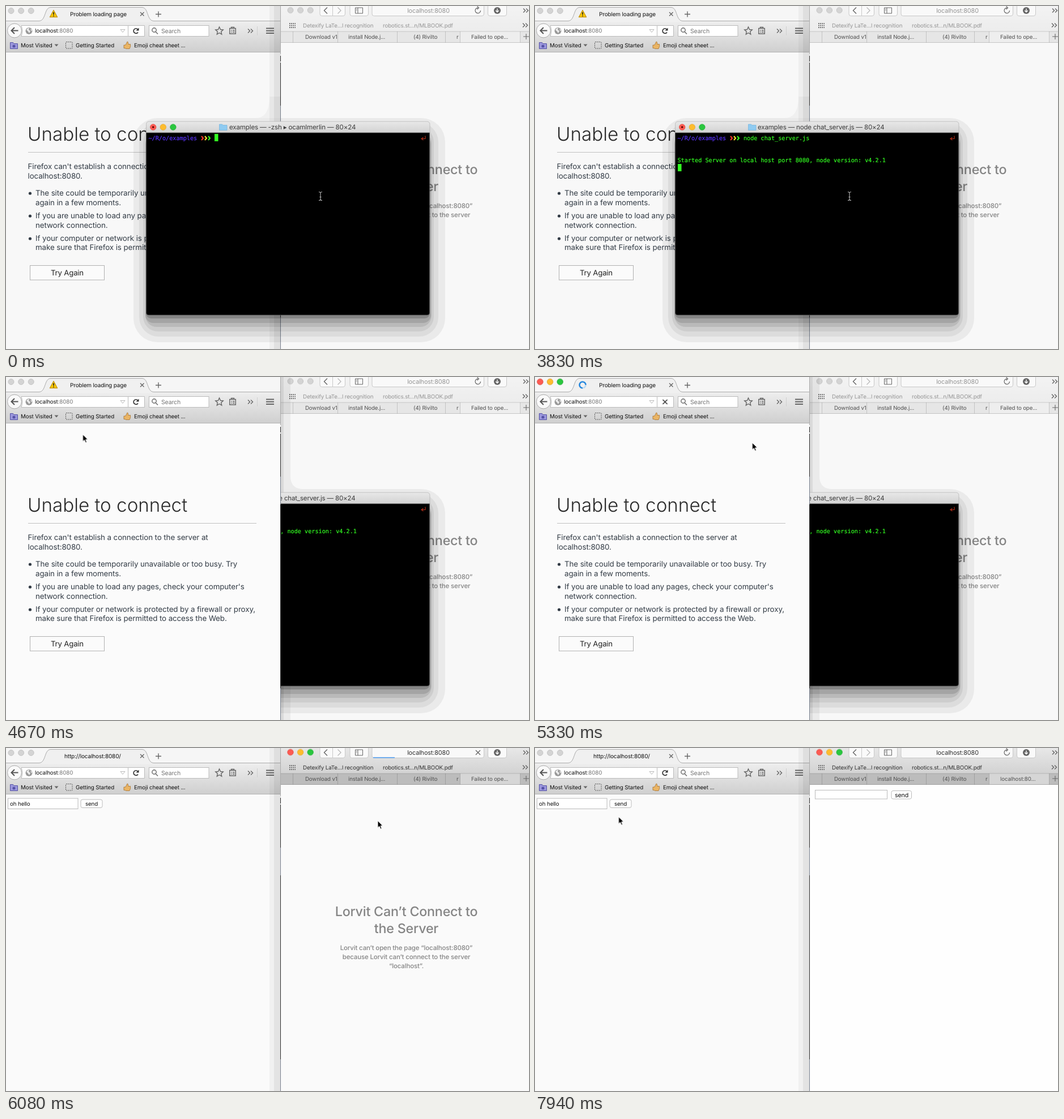
Recreate the animation shown at these times as an HTML page. Size 923 by 606 pixels, loop 8 s.

```html
<!DOCTYPE html>
<html lang="en">
<head>
<meta charset="utf-8">
<title>Chat server demo</title>
<style>
html, body { margin: 0; width: 100%; height: 100%; overflow: hidden; background: #f8f8f8; }
svg { position: absolute; left: 0; top: 0; width: 923px; height: 606px; }
text { font-family: Inter, "Open Sans", sans-serif; letter-spacing: -.014em; text-rendering: geometricPrecision; white-space: pre; }
.mono text { font: 10.19px "DejaVu Sans Mono", monospace; letter-spacing: 0; fill: #3f2; stroke: #3f2; stroke-width: .2; }
.mono .path { fill: #5b33ff; stroke: #5b33ff; }
.line { fill: none; stroke: #666; stroke-width: 1.4; }
.box { fill: #fff; stroke: #bbb; }
.mid { text-anchor: middle; }
.ui { font-size: 9.8px; fill: #111; }
.tabs { font-size: 9.7px; fill: #505050; }
.head { font-size: 33.2px; font-weight: 350; letter-spacing: 0; fill: #2b2b2b; }
.body { font-size: 13.35px; fill: #323b45; }
.body text { letter-spacing: -.007em; }
.gray { fill: #858585; font-weight: 500; }
.big { font-size: 23.3px; letter-spacing: -.01em; }
.note { font-size: 11.5px; }

.t { animation: 8s step-end infinite; }
.ffPage { animation-name: ffPage; }
.ffBack { animation-name: ffBack; }
.ffFront { animation-name: ffFront; }
.ffActive { animation-name: ffActive; }
.ffIdle { animation-name: ffIdle; }
.ffBusy { animation-name: ffBusy; }
.ffStatus { animation-name: ffStatus; }
.ffOld { animation-name: ffOld; }
.ffNew { animation-name: ffNew; }
.sfPage { animation-name: sfPage; }
.sfDim { animation-name: sfDim; }
.sfLit { animation-name: sfLit; }
.sfInk { animation-name: sfInk; }
.sfIdle { animation-name: sfIdle; }
.sfBusy { animation-name: sfBusy; }
.sfOld { animation-name: sfOld; }
.sfNew { animation-name: sfNew; }
.term { animation-name: term; }
.titleA { animation-name: titleA; }
.titleB { animation-name: titleB; }
.command { animation-name: command; }
.output { animation-name: output; }
.block { animation-name: block; }
.beam { animation-name: beam; }
.arrow { animation-name: arrow; }
.mouse { animation: mouse 8s linear infinite; }
.spin { transform-origin: 84px 14px; animation: spin 1s steps(8) infinite; }

@keyframes ffPage { 0% { fill: #f8f8f8 } 58.375% { fill: #fbfbfb } 71.125% { fill: #f8f8f8 } 76%, to { fill: #fafafa } }
@keyframes ffBack { 0% { opacity: 1 } 58.375% { opacity: 0 } 71.125%, to { opacity: 1 } }
@keyframes ffFront { 0% { opacity: 0 } 58.375% { opacity: 1 } 71.125%, to { opacity: 0 } }
@keyframes ffActive { 0% { opacity: 0 } 59.125% { opacity: 1 } 71.125%, to { opacity: 0 } }
@keyframes ffIdle { 0% { opacity: 1 } 66.625% { opacity: 0 } 76%, to { opacity: 1 } }
@keyframes ffBusy { 0% { opacity: 0 } 66.625% { opacity: 1 } 76%, to { opacity: 0 } }
@keyframes ffStatus { 0% { opacity: 0 } 68.125% { opacity: 1 } 76%, to { opacity: 0 } }
@keyframes ffOld { 0% { opacity: 1 } 76%, to { opacity: 0 } }
@keyframes ffNew { 0% { opacity: 0 } 76%, to { opacity: 1 } }
@keyframes sfPage { 0% { fill: #f8f8f8 } 76% { fill: #fafafa } 78.625%, to { fill: #fefefe } }
@keyframes sfDim { 0% { opacity: 1 } 71.875%, to { opacity: 0 } }
@keyframes sfLit { 0% { opacity: 0 } 71.875%, to { opacity: 1 } }
@keyframes sfInk { 0% { fill: #959595 } 71.875%, to { fill: #303030 } }
@keyframes sfIdle { 0% { opacity: 1 } 75.25% { opacity: 0 } 78.625%, to { opacity: 1 } }
@keyframes sfBusy { 0% { opacity: 0 } 75.25% { opacity: 1 } 78.625%, to { opacity: 0 } }
@keyframes sfOld { 0% { opacity: 1 } 78.625%, to { opacity: 0 } }
@keyframes sfNew { 0% { opacity: 0 } 78.625%, to { opacity: 1 } }
@keyframes term {
  0% { clip-path: inset(0); opacity: 1 }
  58.375% { clip-path: inset(0 0 0 485px); opacity: 1 }
  71.125%, to { clip-path: inset(0); opacity: 0 }
}
@keyframes titleA { 0% { opacity: 1 } 29.125%, to { opacity: 0 } }
@keyframes titleB { 0% { opacity: 0 } 29.125%, to { opacity: 1 } }
@keyframes command { 0% { opacity: 0 } 12.625%, to { opacity: 1 } }
@keyframes output { 0% { opacity: 0 } 34.375%, to { opacity: 1 } }
@keyframes block {
  0% { transform: translate(368px, 226px); opacity: 1 }
  4.5% { transform: translate(368px, 226px); opacity: 0 }
  10.5% { transform: translate(368px, 226px); opacity: 1 }
  12.625% { transform: translate(485px, 226px); opacity: 1 }
  27.625% { transform: translate(252px, 239px); opacity: 1 }
  34.375% { transform: translate(252px, 279px); opacity: 1 }
  41.875% { transform: translate(252px, 279px); opacity: 0 }
  47.875%, to { transform: translate(252px, 279px); opacity: 1 }
}
@keyframes beam { 0% { opacity: 1 } 55.375%, to { opacity: 0 } }
@keyframes arrow { 0% { opacity: 0 } 55.375%, to { opacity: 1 } }
@keyframes mouse {
  0%, 52.375% { transform: translate(555px, 336px); animation-timing-function: steps(5, start) }
  56.125% { transform: translate(205px, 172px); animation-timing-function: steps(2, start) }
  57.625% { transform: translate(118px, 110px); animation-timing-function: step-end }
  58.375%, 59.125% { transform: translate(135.5px, 101.5px); animation-timing-function: steps(4, start) }
  62.125%, 64.375% { transform: translate(146px, 104px); animation-timing-function: steps(3, start) }
  66.625% { transform: translate(290px, 112px); animation-timing-function: steps(3, start) }
  68.875% { transform: translate(570px, 124px); animation-timing-function: steps(3, start) }
  71.125%, 78.625% { transform: translate(656px, 128.5px); animation-timing-function: steps(4, start) }
  81.625% { transform: translate(420px, 136px); animation-timing-function: steps(4, start) }
  85%, 88.75% { transform: translate(190.5px, 147px); animation-timing-function: steps(5, start) }
  92.5% { transform: translate(152px, 146px); animation-timing-function: steps(3, start) }
  94.75% { transform: translate(134.5px, 138px); animation-timing-function: steps(5, start) }
  98.5% { transform: translate(147px, 122px); animation-timing-function: step-end }
  99.25%, to { transform: translate(147.5px, 121.5px) }
}
@keyframes spin { to { transform: rotate(360deg) } }
</style>
</head>
<body>
<svg viewBox="0 0 923 606">
  <defs>
    <linearGradient id="bar" x2="0" y2="1"><stop stop-color="#eee"/><stop offset="1" stop-color="#cfcfcf"/></linearGradient>
    <linearGradient id="top" x2="0" y2="1"><stop stop-color="#e8e8e8"/><stop offset="1" stop-color="#d2d2d2"/></linearGradient>
    <g id="lights" stroke-width=".6">
      <circle r="5.3" fill="#fc5b53" stroke="#dd4038"/>
      <circle cx="17.6" r="5.3" fill="#fdbc2e" stroke="#dd9d20"/>
      <circle cx="35.2" r="5.3" fill="#2ac63f" stroke="#1ba72c"/>
    </g>
    <g id="dim" fill="#d4d4d4" stroke="#bcbcbc" stroke-width=".8">
      <circle r="5"/><circle cx="17.6" r="5"/><circle cx="35.2" r="5"/>
    </g>
    <path id="more" d="M-4-3.5L-.5 0-4 3.5M1-3.5L4.5 0 1 3.5"/>
    <path id="cross" d="M-4-4L4 4M4-4L-4 4"/>
  </defs>

  <!-- left browser -->
  <rect width="485" height="27" fill="#f6f6f6"/>
  <rect class="t ffPage" y="82" width="485" height="524" fill="#f8f8f8"/>
  <rect y="27" width="485" height="54.5" fill="url(#bar)"/>
  <path d="M0 81.5H484" stroke="#b3b3b3"/>
  <path d="M0 26.5H58C71 26.5 67 2.5 79 2.5H240C252 2.5 248 26.5 261 26.5H484V28H0Z" fill="#f0f0f0"/>
  <path d="M0 26.5H58C71 26.5 67 2.5 79 2.5H240C252 2.5 248 26.5 261 26.5H484" fill="none" stroke="#aaa"/>
  <use href="#dim" x="9" y="8.5"/>
  <use class="t ffActive" href="#lights" x="9" y="8.5"/>
  <path class="line" d="M264 14.5h10M269 9.5v10M237 11l6.5 6.5M243.5 11l-6.5 6.5"/>

  <circle cx="15" cy="43.5" r="12.5" fill="#f9f9f9" stroke="#aaa"/>
  <path d="M21.5 43.5H9.5M15 38l-5.500 5.500 5.500 5.500" fill="none" stroke="#555" stroke-width="2"/>
  <path class="box" d="M27 34.5H244.5V53.5H27Q30.5 44 27 34.5Z"/>
  <g fill="#999"><circle cx="40.5" cy="44" r="6"/><path d="M36 42q3-4 5-3l-1 3 3 2-2 4-2-3zM43 40l3 2-1 3z" fill="#eee"/></g>
  <path d="M202 41.5h8l-4 5zM215.5 35v18" fill="none" stroke="#bbb"/>
  <text class="ui" x="51" y="47.3">localhost<tspan fill="#777">:8080</tspan></text>
  <g class="t ffIdle">
    <path d="M233 46.5A4.3 4.3 0 1 1 232.5 41" fill="none" stroke="#333" stroke-width="1.7"/>
    <path d="M234.5 38.5v5h-5z" fill="#333"/>
  </g>
  <use class="t ffBusy" href="#cross" x="229.5" y="44" stroke="#333" stroke-width="1.6" opacity="0"/>
  <rect class="box" x="252.5" y="34.5" width="105.5" height="19"/>
  <g class="line"><circle cx="261.5" cy="42.5" r="3.7"/><path d="M264 45.5l4 4"/></g>
  <text x="274" y="47.5" font-size="10.5" fill="#757575">Search</text>
  <g class="line">
    <path d="M376.5 37l2 4.500 4.800.500-3.600 3.200 1 4.800-4.200-2.500-4.200 2.500 1-4.800-3.600-3.200 4.800-.500z"/>
    <path d="M394.7 39.5h10.6v9.5h-10.6zM397.5 39.5v-2h5v2M397 43h1.5M400 43h3.5M397 46h1.5M400 46h3.5"/>
    <use href="#more" x="431" y="44"/>
    <path d="M459 39.5h14M459 43.7h14M459 48h14" style="stroke-width:2"/>
  </g>
  <path d="M443.5 36v16" stroke="#d0d0d0"/>

  <path d="M7.5 75.5V64.5h5l1.5 2h6.5v9z" fill="#9a96dc" stroke="#5552a5"/>
  <circle cx="14" cy="71" r="2.5" fill="#5552a5"/>
  <path d="M85.5 67.5h7l-3.5 4z" fill="#666"/>
  <rect x="105.5" y="63.5" width="11.5" height="11.5" rx="1" fill="none" stroke="#555" stroke-dasharray="2 1.3"/>
  <path d="M208 69h3l3-6q2 0 1.5 4.5h4q1 4-1.5 8h-6l-2-1h-2z" fill="#eab565" stroke="#a8712f" stroke-width=".8"/>
  <g class="ui">
    <text x="26" y="73">Most Visited</text>
    <text x="123" y="73">Getting Started</text>
    <text x="226" y="73">Emoji cheat sheet ...</text>
  </g>

  <g class="t ffOld">
    <g class="t ffIdle">
      <path d="M84 7.5l6.5 12h-13z" fill="#fc0" stroke="#c79a16" stroke-linejoin="round" stroke-width="1.5"/>
      <path d="M84 11v4.5M84 16.7v1.6" stroke="#222" stroke-width="1.7"/>
    </g>
    <g class="t ffBusy" opacity="0">
      <g class="spin" fill="none" stroke-width="2.4">
        <circle cx="84" cy="14" r="5.5" stroke="#b9d9f3"/>
        <path d="M84 8.5A5.5 5.5 0 1 0 89.5 14" stroke="#2787dc"/>
      </g>
    </g>
    <text x="113" y="17.7" font-size="9.95" fill="#111">Problem loading page</text>
    <text class="head" x="38" y="237.5">Unable to connect</text>
    <path d="M39 258.5H442" stroke="#c1c1c1"/>
    <g class="body">
      <text x="38.5" y="288.3">Firefox can't establish a connection to the server at</text>
      <text x="38.5" y="304.8">localhost:8080.</text>
      <text x="52" y="334.8">The site could be temporarily unavailable or too busy. Try</text>
      <text x="52" y="351.5">again in a few moments.</text>
      <text x="52" y="375">If you are unable to load any pages, check your computer's</text>
      <text x="52" y="391.5">network connection.</text>
      <text x="52" y="414.8">If your computer or network is protected by a firewall or proxy,</text>
      <text x="52" y="431.3">make sure that Firefox is permitted to access the Web.</text>
      <circle cx="42.5" cy="331" r="2.6"/><circle cx="42.5" cy="371" r="2.6"/><circle cx="42.5" cy="411" r="2.6"/>
    </g>
    <rect x="42.5" y="458.5" width="131" height="25.5" fill="#fbfbfb" stroke="#b1b1b1"/>
    <text class="mid" x="108" y="475.5" font-size="13.2" fill="#222">Try Again</text>
    <g class="t ffStatus" opacity="0">
      <path d="M-1 591.5H155q2.5 0 2.5 2.5V607H-1z" fill="#eee" stroke="#b5b5b5"/>
      <text class="ui" x="0" y="603.7">Transferring data from localhost...</text>
    </g>
  </g>
  <g class="t ffNew" opacity="0">
    <text x="103" y="17.7" font-size="10" fill="#111">http://localhost:8080/</text>
    <rect class="box" x="3.5" y="89" width="123.5" height="18.5"/>
    <text class="ui" x="7" y="101.8">oh hello</text>
    <rect class="box" x="132" y="91" width="38" height="14.5" rx="3"/>
    <text class="ui mid" x="151" y="101.8">send</text>
  </g>
  <g class="t ffBack">
    <path d="M473 0H485V606H473z" fill-opacity=".06"/>
    <path d="M465 0H485V606H465z" fill-opacity=".035"/>
  </g>

  <!-- right browser -->
  <rect class="t sfPage" x="485" y="65" width="438" height="541" fill="#f8f8f8"/>
  <rect x="485" width="438" height="45" fill="url(#top)"/>
  <rect x="485" y="45" width="438" height="20" fill="#bcbcbc"/>
  <rect x="801.5" y="45" width="106" height="19.5" fill="#d6d6d6"/>
  <rect class="t sfDim" x="485" width="438" height="65" fill="#f8f8f8" fill-opacity=".7"/>
  <path d="M485 45H923M485 64.5H923M506.5 45v19.5M585.5 45v19.5M690.5 45v19.5M775.5 45v19.5M801.5 45v19.5M907.5 45v19.5" stroke="#000" stroke-opacity=".15"/>
  <rect x="646" y="-3" width="197.5" height="20.5" rx="3.5" fill="#f9f9f9" stroke="#c8c8c8"/>
  <path class="t sfBusy" d="M648 17H686" stroke="#4a9bf0" stroke-width="1.5" opacity="0"/>
  <g class="t sfInk">
    <text class="mid" x="745.5" y="12" font-size="10.9">localhost:8080</text>
    <g font-size="9.8">
      <text x="524" y="37.5">Detexify LaTe...l recognition</text>
      <text x="665" y="37.5">robotics.st...n/MLBOOK.pdf</text>
    </g>
  </g>
  <g class="tabs">
    <text x="528" y="58">Download v1</text>
    <text x="604" y="58">install Node.j...</text>
    <text x="719" y="58">(4) Rivilto</text>
    <text x="795" y="58">r</text>
    <text class="t sfOld" x="821" y="58">Failed to ope...</text>
    <text class="t sfNew" x="821" y="58" opacity="0">localhost:80...</text>
  </g>
  <path d="M500 31h11M500 34.5h11M500 38h11" stroke="#666" stroke-width="1.8" stroke-dasharray="1.8 1.4"/>
  <use class="t sfDim" href="#dim" x="502" y="7.5"/>
  <use class="t sfLit" href="#lights" x="502" y="7.5" opacity="0"/>
  <g fill="#fafafa" stroke="#c8c8c8">
    <rect x="554" y="-3" width="44.5" height="20.5" rx="3.5"/><path d="M576.5 0v17"/>
    <rect x="607" y="-3" width="32.5" height="20.5" rx="3.5"/>
    <rect x="850.5" y="-3" width="33" height="20.5" rx="3.5"/>
  </g>
  <path d="M585.5 2.5L591 8l-5.5 5.5" fill="none" stroke="#bbb" stroke-width="1.4"/>
  <g class="line">
    <path d="M567 2.5L561.5 8l5.5 5.5"/>
    <path d="M616.5 3h13v10h-13zM621 3v10M618 5.5h1.5M618 8h1.5" style="stroke-width:1"/>
    <use href="#more" x="917" y="8"/><use href="#more" x="916" y="34"/>
    <path d="M913 54h10M918 49v10" style="stroke-width:1.1"/>
    <path class="t sfIdle" d="M837.5 8A4.7 4.7 0 1 1 833 3.3M831.5.5L834.5 3.3 831.5 6" style="stroke-width:1.2"/>
    <use class="t sfBusy" href="#cross" x="833" y="8" opacity="0"/>
  </g>
  <circle cx="867" cy="8" r="6" fill="#666"/>
  <path d="M867 4.5v6M864.3 8l2.7 2.8L869.7 8" fill="none" stroke="#fff" stroke-width="1.4"/>

  <g class="t sfOld">
    <g class="gray mid">
      <text class="big" x="706.5" y="297">Lorvit Can’t Connect to</text>
      <text class="big" x="706.5" y="327">the Server</text>
      <text class="note" x="706.5" y="357">Lorvit can’t open the page “localhost:8080”</text>
      <text class="note" x="706.5" y="373">because Lorvit can’t connect to the server</text>
      <text class="note" x="706.5" y="388.7">“localhost”.</text>
    </g>
  </g>
  <g class="t sfNew" opacity="0">
    <rect class="box" x="494.5" y="74.5" width="127" height="15.5"/>
    <rect class="box" x="629" y="75.5" width="35.5" height="14.5" rx="3"/>
    <text class="mid" x="647" y="86.5" font-size="10.7" fill="#111">send</text>
  </g>
  <g class="t ffFront" opacity="0">
    <path d="M485 0H490V606H485z" fill-opacity=".07"/>
    <path d="M485 0H502V175Q502 198 525 198H485z" fill-opacity=".05"/>
    <path d="M485 545H502V606H485z" fill-opacity=".05"/>
  </g>
  <path d="M484.5 0V85" stroke="#aaa"/>
  <path d="M484.5 88V98M484.5 100V176M484.5 225V550" stroke="#2c2c2c"/>
  <path d="M484.5 176V225M484.5 550V606" stroke="#78808e"/>
</svg>

<!-- terminal -->
<svg class="t term" viewBox="0 0 923 606">
  <path d="M465 160Q465 198 440 198H485V160z" fill-opacity=".03"/>
  <rect x="225" y="198" width="550" height="396" rx="42" fill-opacity=".055"/>
  <rect x="235" y="206" width="528" height="378" rx="34" fill-opacity=".06"/>
  <rect x="242" y="214" width="513" height="361" rx="26" fill-opacity=".07"/>
  <rect x="246" y="222" width="505" height="345" rx="20" fill-opacity=".09"/>
  <rect x="246" y="230" width="504" height="330" rx="14" fill-opacity=".12"/>
  <rect x="247" y="238" width="501" height="314" rx="9" fill-opacity=".18"/>
  <path d="M247.5 224V209.5q0-5.500 5.500-5.500H742.5q5.500 0 5.500 5.500V224z" fill="url(#top)" stroke="#b5b5b5" stroke-width=".8"/>
  <path d="M247.5 224H747.5V542q0 4-4 4H251.5q-4 0-4-4z" stroke="#555" stroke-width=".8"/>
  <use href="#lights" x="259.7" y="214"/>
  <circle cx="259.7" cy="214" r="1.8" fill="#5c0500"/>
  <path d="M376.5 219.5V209h5l1.5 1.5h7v9z" fill="#8fcbf1" stroke="#72b3dd" stroke-width=".7"/>
  <g fill="#3c3c3c">
    <text class="t titleA" x="394" y="218.3" font-size="11.6">examples — -zsh <tspan font-family="DejaVu Sans, sans-serif">▸</tspan> ocamlmerlin — 80×24</text>
    <text class="t titleB" x="393" y="218.3" font-size="11.5" opacity="0">examples — node chat_server.js — 80×24</text>
  </g>
  <g class="mono">
    <text class="path" x="251.5" y="237">~/R/o/examples</text>
    <g fill="none" stroke-width="2">
      <path d="M345 230l3 3.5-3 3.5" stroke="#ff3a2d"/>
      <path d="M351 230l3 3.5-3 3.5" stroke="#ffe62e"/>
      <path d="M357 230l3 3.5-3 3.5" stroke="#3f2"/>
      <path d="M740 229.5V234.5H734M736.5 232l-3.5 2.5 3.5 2.5" stroke="#b5301a" stroke-width="1.1"/>
    </g>
    <text class="t command" x="368" y="237" opacity="0">node chat_server.js</text>
    <text class="t output" x="251.5" y="276.3" opacity="0">Started Server on local host port 8080, node version: v4.2.1</text>
    <rect class="t block" width="6.5" height="13" fill="#3f2"/>
  </g>
</svg>

<!-- pointer -->
<svg viewBox="0 0 923 606">
  <g class="mouse">
    <path class="t beam" d="M-3-7.5Q0-7.5 0-5.5Q0-7.5 3-7.5M0-6V6M-3 7.5Q0 7.5 0 5.5Q0 7.5 3 7.5M-1.5 1.5h3" fill="none" stroke="#b5b5b5" stroke-width="1.1"/>
    <path class="t arrow" opacity="0" d="M0 0V12.5L2.9 9.8 5 14.6 7.1 13.7 5.1 9H9Z" stroke="#fff"/>
  </g>
</svg>
</body>
</html>
```
